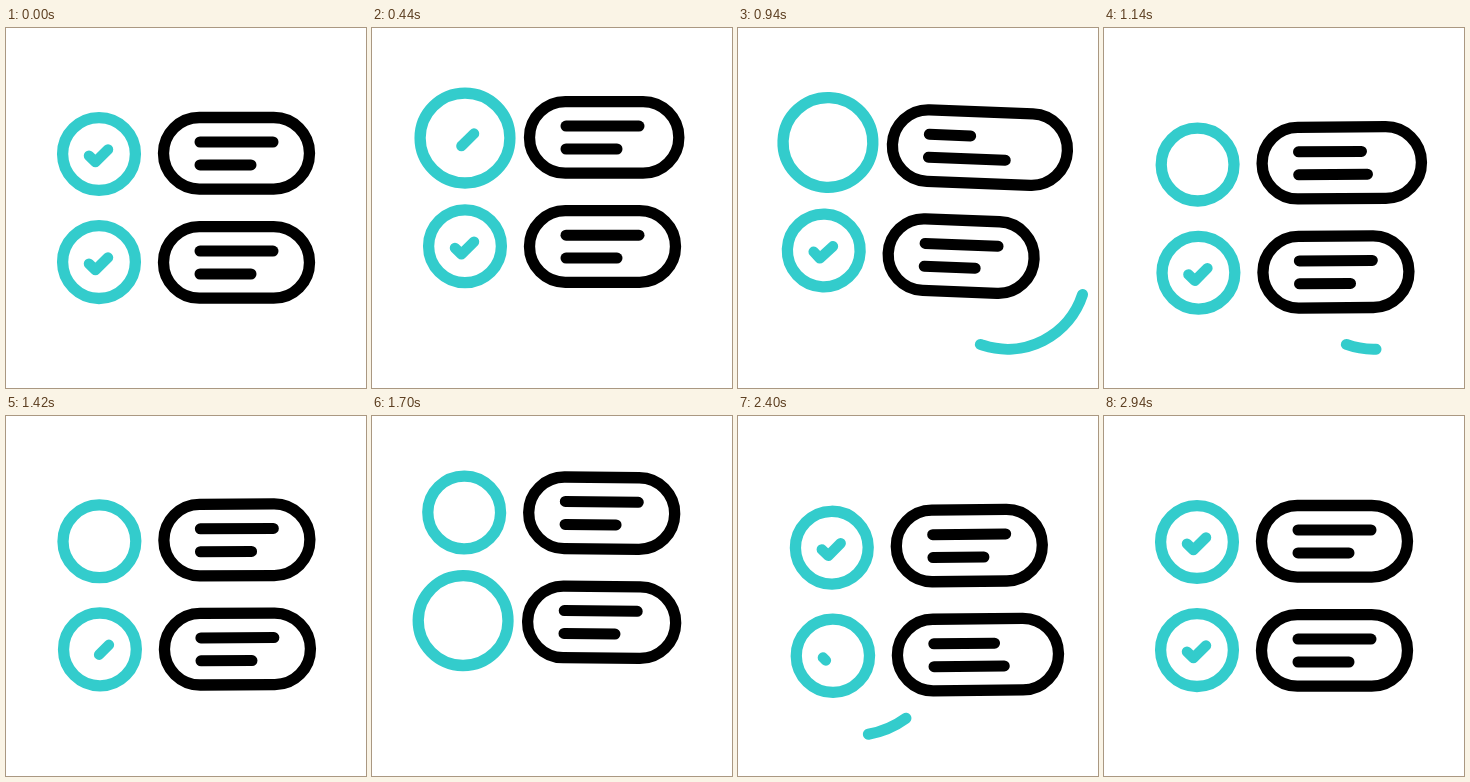
An HTML page with a canvas for the animation above (3120 ms loop, 360 px wide and 360 px high).

```html
<!DOCTYPE html>
<html lang="en">
<head>
<meta charset="utf-8">
<title>Checklist</title>
<style>
  html, body { margin: 0; width: 100%; height: 100%; overflow: hidden; background: #fff; }
  canvas { display: block; width: 360px; height: 360px; }
</style>
</head>
<body>
<canvas id="stage" width="360" height="360"></canvas>
<script>
const LOOP = 3120, STEP = 20, LAG = 1280;
const TEAL = '#33cccc', BLACK = '#000';
const DEG = Math.PI / 180;
const ctx = document.getElementById('stage').getContext('2d');

// Keys are [time, value] pairs, joined by ease-in-out.
function track(t, keys) {
  if (t <= keys[0][0]) return keys[0][1];
  for (let i = 1; i < keys.length; i++) {
    const [t0, a] = keys[i - 1], [t1, b] = keys[i];
    if (t < t1) {
      const u = (t - t0) / (t1 - t0);
      return a + (b - a) * u * u * (3 - 2 * u);
    }
  }
  return keys[keys.length - 1][1];
}

const lift = [[190, 0], [660, -29], [1215, 12], [1770, -30.5], [2325, 5], [2940, 0]];
const tilt = [[480, 0], [840, 2.9], [1200, -0.7], [1590, 0], [1990, 3.1], [2420, -0.6], [2860, 0]];
const grow = [[180, 0], [420, 8.5], [940, 8.5], [1140, 0]];
const stretch = [[350, 0], [800, 32], [840, 32], [1380, 0]];
const upper = [[480, 0], [840, -36], [1300, 0]];
const lower = [[480, 0], [960, 26], [1440, 0]];
const head = [[440, 0], [895, 1]];
const tail = [[800, 0], [1270, 1]];

const items = [
  { ring: 126, pill: 125.3, lag: 0, erase: [[180, 0], [840, 1]], write: [[1780, 0], [2430, 1]] },
  { ring: 234.1, pill: 234.4, lag: LAG, erase: [[1160, 0], [1690, 1]], write: [[2260, 0], [2820, 1]] }
];

const arcs = [
  { x: 269.4, y: 242.2, r: 79, from: -7, to: 110, lag: 0 },
  { x: 114.5, y: 228.6, r: 91, from: 162, to: 54, lag: LAG }
];

function pen(color, width) {
  ctx.strokeStyle = color;
  ctx.lineWidth = width;
  ctx.lineCap = ctx.lineJoin = 'round';
  ctx.beginPath();
}

function line(x, y, len) {
  pen(BLACK, 11);
  ctx.moveTo(x, y);
  ctx.lineTo(x + len, y);
  ctx.stroke();
}

// Draws the tick between two fractions of its length.
function tick(x, y, a, b) {
  if (b - a < 0.004) return;
  const pts = [[-10, 1.7], [-3.6, 8], [9, -4.5]];
  const elbow = 0.34;
  const at = f => {
    const i = f < elbow ? 0 : 1;
    const u = i ? (f - elbow) / (1 - elbow) : f / elbow;
    return [0, 1].map(k => pts[i][k] + (pts[i + 1][k] - pts[i][k]) * u);
  };
  const path = [at(a)];
  if (a < elbow && b > elbow) path.push(pts[1]);
  path.push(at(b));
  pen(TEAL, 10.5);
  path.forEach(([px, py], i) => ctx[i ? 'lineTo' : 'moveTo'](x + px, y + py));
  ctx.stroke();
}

function drawItem(item, t) {
  const s = t - item.lag, { ring, pill } = item;

  pen(TEAL, 11.3);
  ctx.arc(93, ring, 36.4 + track(s, grow), 0, Math.PI * 2);
  ctx.stroke();

  const write = track(t, item.write);
  if (write > 0) tick(93, ring, 0, write);
  else tick(93, ring, track(t, item.erase), 1);

  pen(BLACK, 11.3);
  ctx.roundRect(157.5, pill - 35.8, 146 + track(s, stretch), 71.6, 35.8);
  ctx.stroke();

  line(194, pill - 11.3, 73 + track(s, upper));
  line(194, pill + 11.6, 51 + track(s, lower));
}

function drawArc(arc, t) {
  const a = track(t - arc.lag, tail), b = track(t - arc.lag, head);
  if (b - a < 0.004) return;
  const angle = f => (arc.from + (arc.to - arc.from) * f) * DEG;
  pen(TEAL, 11);
  ctx.arc(arc.x, arc.y, arc.r, angle(a), angle(b), arc.to < arc.from);
  ctx.stroke();
}

function draw(t) {
  ctx.fillStyle = '#fff';
  ctx.fillRect(0, 0, 360, 360);

  const rot = track(t, tilt);
  ctx.save();
  ctx.translate(180 - 2.35 * rot, 180 + track(t, lift));
  ctx.rotate(rot * DEG);
  ctx.translate(-180, -180);
  items.forEach(item => drawItem(item, t));
  ctx.restore();

  arcs.forEach(arc => drawArc(arc, t));
}

const start = performance.now();
function frame() {
  const t = (performance.now() - start) % LOOP;
  draw(Math.floor(t / STEP) * STEP);
  requestAnimationFrame(frame);
}
frame();
</script>
</body>
</html>
```
